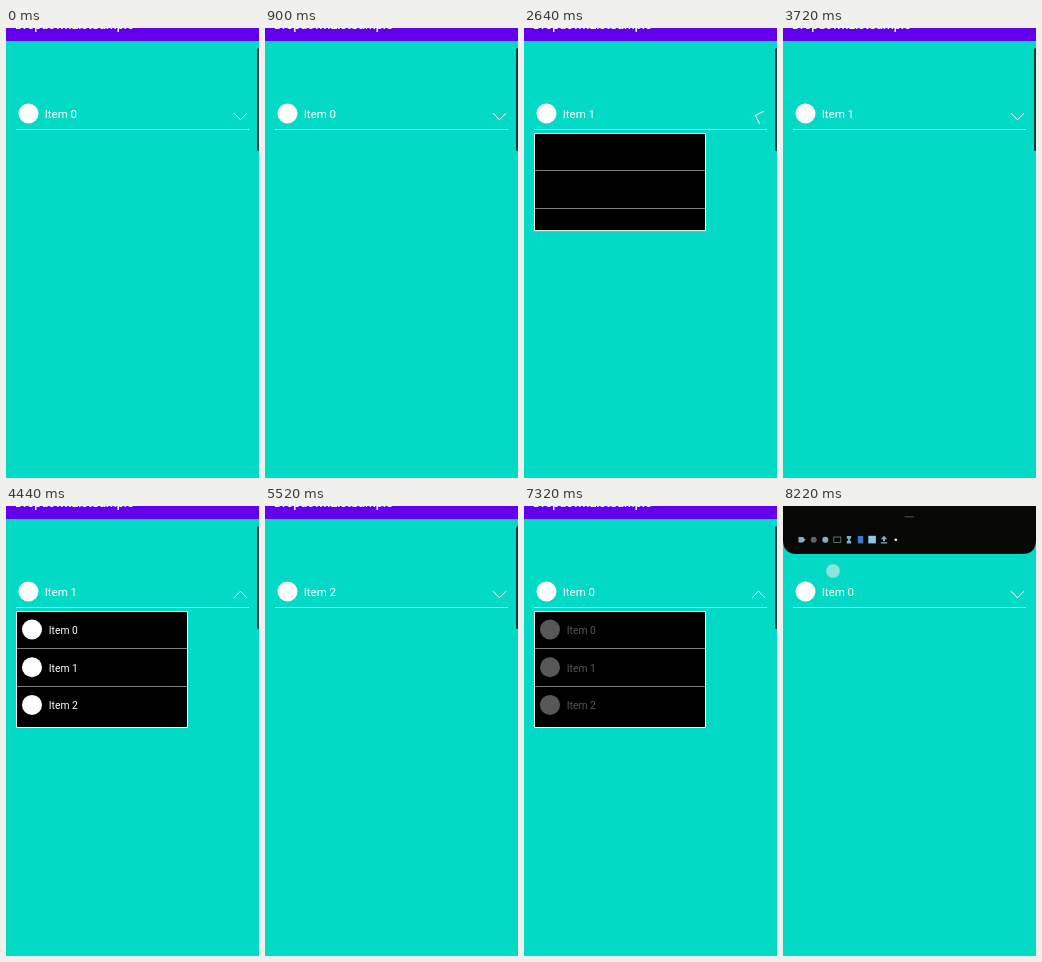
An HTML page that plays this animation: 253x450 px, repeating every 8.28 s.

```html
<!DOCTYPE html>
<html lang="en">
<head>
<meta charset="utf-8">
<title>Dropdown list</title>
<style>
  html, body { margin: 0; width: 100%; height: 100%; overflow: hidden; background: #03dac5; }
  svg { display: block; width: 100%; height: 100%; }
  text { font-family: Roboto, "Open Sans", sans-serif; fill: #fff; }
  .title { font-size: 12.4px; font-weight: 500; }
  .current { font-size: 11.5px; }
  .item { font-size: 10.3px; }
</style>
</head>
<body>
<svg viewBox="0 0 253 450" preserveAspectRatio="none">
  <rect width="253" height="450" fill="#03dac5"/>
  <rect width="253" height="13" fill="#6200ee"/>
  <text class="title" x="9" y="1">DropdownListSample</text>
  <rect id="edge" x="251" y="20" width="4" height="103" rx="1.5" fill="#0b3b38"/>

  <circle cx="22.5" cy="85.5" r="10" fill="#fff"/>
  <text id="current" class="current" x="38.7" y="90">Item 0</text>
  <path id="arrow" d="M228 85.2 L234.5 91.8 L241 85.2" fill="none" stroke="#fff"/>
  <rect x="10" y="101" width="233" height="1" fill="#fff" opacity=".8"/>

  <clipPath id="clip"><rect id="window" x="10" y="105" width="172" height="117"/></clipPath>
  <g id="list">
    <rect id="panel" x="10.5" y="105.5" width="171" height="116" fill="#000" stroke="#fff"/>
    <g clip-path="url(#clip)">
      <path id="rules" d="M11 142.5 H181 M11 180.5 H181" stroke="#7c7c7c"/>
      <g id="items"></g>
    </g>
  </g>

  <g id="shade">
    <path d="M0 -60 H253 V34 Q253 48 239 48 H14 Q0 48 0 34 Z" fill="#080806"/>
    <rect x="121.500" y="10" width="9.500" height="1.400" rx=".7" fill="#3a3a3a"/>
    <g fill="#86aec4">
      <path d="M15.500 31 H20 L22.500 33.700 L20 36.400 H15.500 Z"/>
      <circle cx="30.700" cy="33.700" r="3" fill="#606466"/>
      <circle cx="42.300" cy="33.700" r="3"/>
      <rect x="50.800" y="31" width="7" height="5.400" fill="none" stroke="#76848a" stroke-width=".8"/>
      <path d="M63.800 30 H68.200 V32 L66.600 33.700 L68.200 35.500 V37.500 H63.800 V35.500 L65.400 33.700 L63.800 32 Z"/>
      <rect x="74.800" y="30" width="5.400" height="7.400" fill="#3f78d0"/>
      <rect x="85.300" y="29.800" width="7.600" height="7.600" fill="#8fc8e4"/>
      <path d="M101 29.800 L104.200 33.200 H102 V35.300 H100 V33.200 H97.800 Z M97.800 36.300 H104.200 V37.400 H97.800 Z"/>
      <circle cx="112.800" cy="33.800" r="1.300" fill="#fff"/>
    </g>
    <circle cx="50" cy="65" r="7" fill="#c9efe9" fill-opacity=".65" stroke="#78b8b0" stroke-opacity=".6" stroke-width=".8"/>
  </g>
</svg>

<script>
const LOOP = 8280, STEP = 300, FULL = 116;
const SHADE_AT = 8100;

// open: expand, then fade in; close: fade out, then collapse
const cycles = [
  { open: 970, close: 2220, pick: 1 },
  { open: 3840, close: 4800, pick: 2 },
  { open: 6090, close: 7140, pick: 0 }
];

const $ = id => document.getElementById(id);
const part = (t, start, span = STEP) => Math.min(1, Math.max(0, (t - start) / span));
const smooth = p => (1 - Math.cos(Math.PI * p)) / 2;
const slowEnd = p => 1 - (1 - p) ** 2;

$('items').innerHTML = [0, 1, 2].map(i => `
  <circle cx="26" cy="${123.5 + 37.7 * i}" r="10" fill="#fff"/>
  <text class="item" x="42.800" y="${127.8 + 37.7 * i}">Item ${i}</text>`).join('');

function state(t) {
  let picked = 0;
  for (const { open, close, pick } of cycles) {
    if (t < open) break;
    if (t < close) {
      const grow = slowEnd(part(t, open));
      const fade = smooth(part(t, open + STEP));
      return { picked, size: grow, turn: grow, items: fade, rules: fade };
    }
    picked = pick;
    if (t < close + 2 * STEP) {
      const p = part(t, close + STEP);
      return { picked, size: 1 - p * p, turn: 1 - p, items: 1 - smooth(part(t, close)), rules: 1 };
    }
  }
  return { picked, size: 0, turn: 0, items: 0, rules: 0 };
}

const show = (id, on) => $(id).setAttribute('visibility', on ? 'visible' : 'hidden');

function draw(t) {
  const s = state(t);
  const height = FULL * s.size;
  $('current').textContent = 'Item ' + s.picked;
  $('arrow').setAttribute('transform', `rotate(${180 * s.turn} 234.5 88.5)`);
  show('list', height > 0.5);
  $('panel').setAttribute('height', height);
  $('window').setAttribute('height', height);
  $('items').setAttribute('opacity', s.items);
  $('rules').setAttribute('opacity', s.rules);

  const pulled = t >= SHADE_AT;
  show('shade', pulled);
  show('edge', !pulled);
  $('shade').setAttribute('transform', `translate(0 ${-32 * (1 - part(t, SHADE_AT, 120))})`);
}

function tick() {
  draw(performance.now() % LOOP);
  requestAnimationFrame(tick);
}
tick();
</script>
</body>
</html>
```
